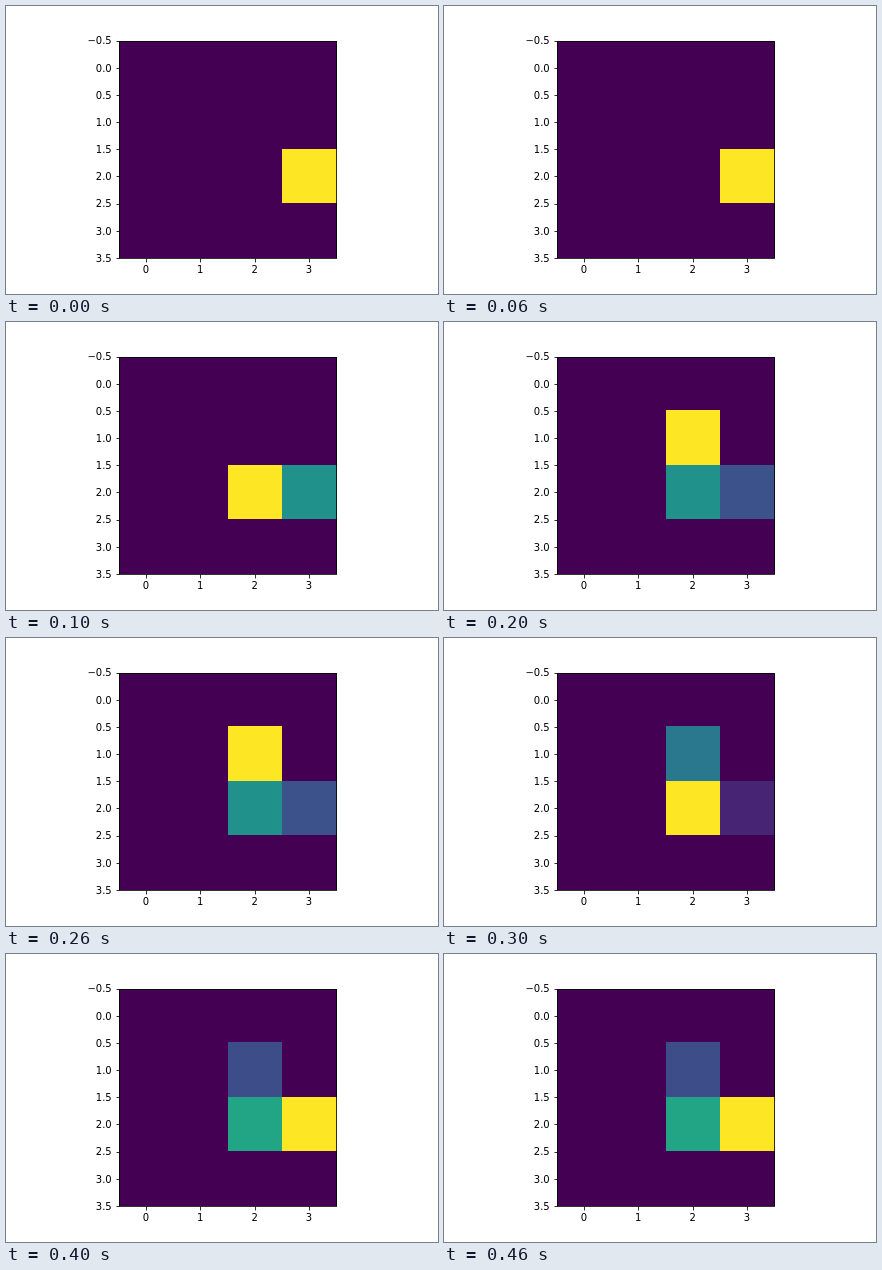
Write an HTML page that moves like this. It is 432 px wide and 288 px high and loops after 0.5 s.

```html
<!DOCTYPE html>
<html lang="en">
<head>
<meta charset="utf-8">
<title>Heatmap</title>
<style>
  html, body { margin: 0; width: 100%; height: 100%; overflow: hidden; background: #fff; }
  svg { display: block; }
  text { font: 10px "DejaVu Sans", sans-serif; fill: #000; }
  .cell { fill: #440154; animation: 500ms step-end infinite; }
  .upper { animation-name: upper; }
  .middle { animation-name: middle; }
  .right { animation-name: right; }
  .axis { fill: none; stroke: #000; stroke-opacity: .8; }

  @keyframes upper {
    0% { fill: #440154; }
    40% { fill: #fde725; }
    60% { fill: #2a788e; }
    80%, 100% { fill: #3d4d8a; }
  }
  @keyframes middle {
    0% { fill: #440154; }
    20% { fill: #fde725; }
    40% { fill: #21918c; }
    60% { fill: #fde725; }
    80%, 100% { fill: #21a585; }
  }
  @keyframes right {
    0% { fill: #fde725; }
    20% { fill: #21918c; }
    40% { fill: #3b528b; }
    60% { fill: #482475; }
    80%, 100% { fill: #fde725; }
  }
</style>
</head>
<body>
<svg width="432" height="288" viewBox="0 0 432 288">
  <g shape-rendering="crispEdges">
    <rect x="113" y="35" width="218" height="217" fill="#440154"/>
    <rect class="cell upper" x="222" y="88" width="54" height="55"/>
    <rect class="cell middle" x="222" y="143" width="54" height="54"/>
    <rect class="cell right" x="276" y="143" width="55" height="54"/>
  </g>
  <g id="ticks"></g>
  <rect class="axis" x="113.5" y="35.5" width="217" height="217"/>
</svg>
<script>
  const LEFT = 112.68, TOP = 34.56, CELL = 54.36;
  const ticks = document.getElementById('ticks');

  function add(tag, attrs, label = '') {
    const el = document.createElementNS('http://www.w3.org/2000/svg', tag);
    for (const key in attrs) el.setAttribute(key, attrs[key]);
    el.textContent = label;
    ticks.append(el);
  }

  for (let v = -0.5; v <= 3.5; v += 0.5) {
    const y = TOP + (v + 0.5) * CELL;
    add('path', { class: 'axis', d: `M110.5 ${Math.round(y) + 0.5}H113.5` });
    add('text', { x: 105.7, y: Math.round(y + 3.8), 'text-anchor': 'end' },
      v.toFixed(1).replace('-', '\u2212'));
  }

  for (let v = 0; v < 4; v++) {
    const x = LEFT + (v + 0.5) * CELL;
    add('path', { class: 'axis', d: `M${Math.round(x) + 0.5} 252.5V256.5` });
    add('text', { x, y: 267, 'text-anchor': 'middle' }, v);
  }
</script>
</body>
</html>
```
